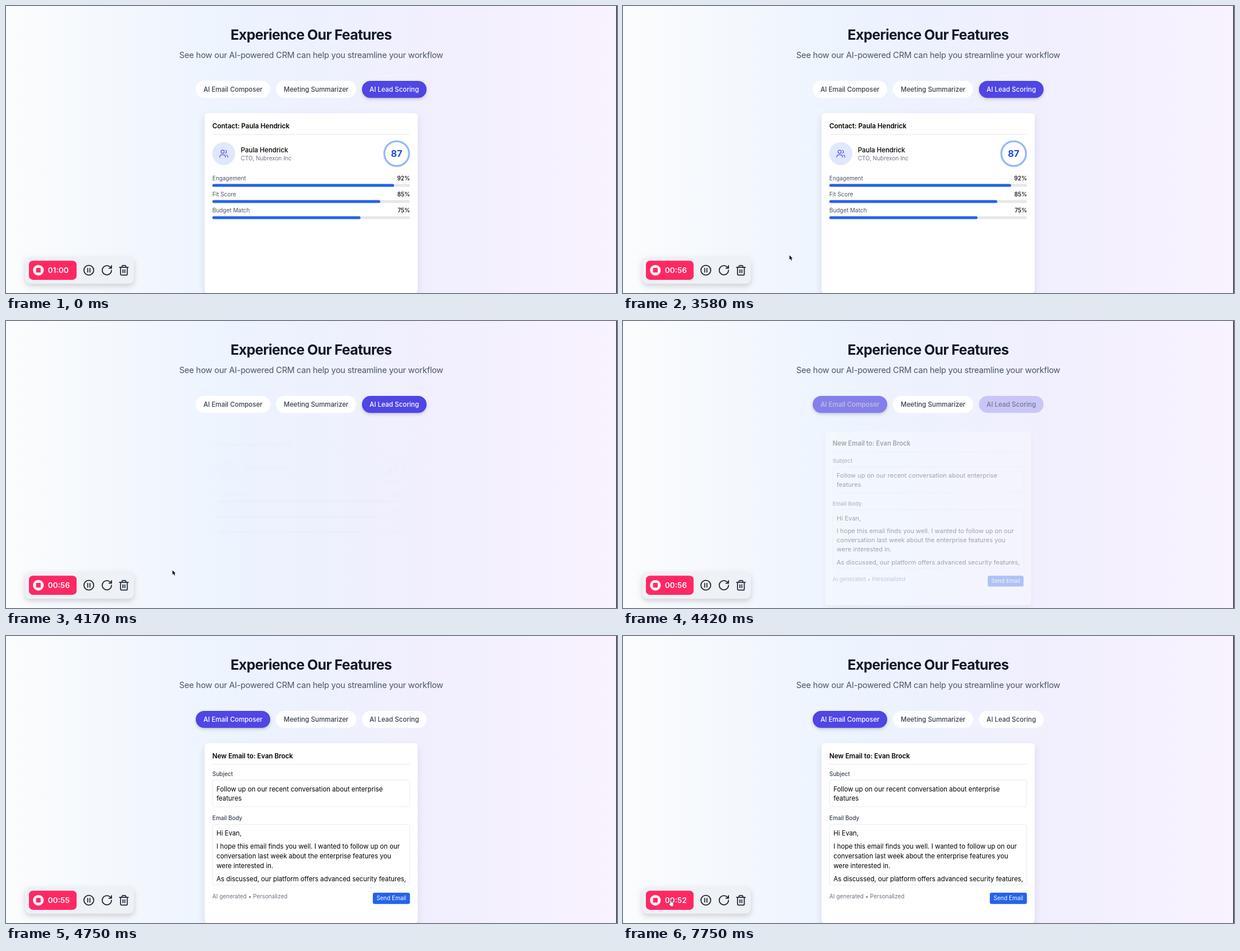
Write an HTML page with a canvas that moves like this. It is 1066 px wide and 502 px high and loops after 8000 ms.

```html
<!DOCTYPE html>
<html lang="en">
<head>
<meta charset="utf-8">
<title>CRM feature demo</title>
<style>
  html, body { margin: 0; width: 100%; height: 100%; overflow: hidden; background: #f3f4fe; }
  canvas { display: block; width: 1066px; height: 502px; }
</style>
</head>
<body>
<canvas id="stage"></canvas>
<script>
const W = 1066, H = 502, LOOP = 8000, FPS = 12;
const INK = '#374151', GREY = '#6b7280', LINE = '#e5e7eb', BLUE = '#2563eb';
const INDIGO = [79, 70, 229], WHITE = [255, 255, 255], SLATE = [55, 65, 81];
const dpr = window.devicePixelRatio || 1;

function makeLayer(canvas) {
  canvas.width = W * dpr;
  canvas.height = H * dpr;
  return canvas.getContext('2d');
}

const stage = makeLayer(document.getElementById('stage'));
const cardLayer = makeLayer(document.createElement('canvas'));
let g = stage;

// ---------- helpers ----------
const clamp = v => Math.max(0, Math.min(1, v));
const easeInOut = v => v < 0.5 ? 2 * v * v : 1 - 2 * (1 - v) * (1 - v);
const mix = (a, b, p) => `rgb(${a.map((v, i) => Math.round(v + (b[i] - v) * p))})`;

// Position on a path of [time, x, y] points, or null before it begins.
function follow(path, t) {
  if (t < path[0][0] - 5) return null;
  let i = 0;
  while (i < path.length - 2 && t > path[i + 1][0]) i++;
  const [t0, x0, y0] = path[i], [t1, x1, y1] = path[i + 1];
  const p = clamp((t - t0) / (t1 - t0));
  return [x0 + (x1 - x0) * p, y0 + (y1 - y0) * p];
}

function text(str, x, y, size, color, weight = 400, align = 'left', tracking = 0) {
  g.font = `${weight} ${size}px Inter, "Open Sans", sans-serif`;
  g.letterSpacing = `${tracking * size}px`;
  g.textAlign = align;
  g.fillStyle = color;
  g.fillText(str, x, y);
}

function box(x, y, w, h, r, fill, stroke) {
  g.beginPath();
  g.roundRect(x, y, w, h, r);
  if (fill) { g.fillStyle = fill; g.fill(); }
  if (stroke) { g.strokeStyle = stroke; g.lineWidth = 0.83; g.stroke(); }
}

function disc(x, y, r, fill) {
  g.beginPath();
  g.arc(x, y, r, 0, Math.PI * 2);
  g.fillStyle = fill;
  g.fill();
}

function shadow(color, dy, blur, draw) {
  g.save();
  g.shadowColor = color;
  g.shadowOffsetY = dy * dpr;
  g.shadowBlur = blur * dpr;
  draw();
  g.restore();
}

// Line icon on a 24-unit grid, centred on x, y.
function icon(d, x, y, scale, color, width = 2) {
  g.save();
  g.translate(x, y);
  g.scale(scale, scale);
  g.translate(-12, -12);
  g.lineCap = g.lineJoin = 'round';
  g.lineWidth = width;
  g.strokeStyle = color;
  g.stroke(new Path2D(d));
  g.restore();
}

const ICONS = {
  users: 'M16 21v-2a4 4 0 0 0-4-4H6a4 4 0 0 0-4 4v2M13 7a4 4 0 1 1-8 0a4 4 0 1 1 8 0M22 21v-2a4 4 0 0 0-3-3.87M16 3.13a4 4 0 0 1 0 7.75',
  pause: 'M22 12a10 10 0 1 1-20 0a10 10 0 1 1 20 0M9.7 8.2v7.6M14.3 8.2v7.6',
  restart: 'M21 12a9 9 0 1 1-9-9c2.52 0 4.93 1 6.74 2.74L21 8M21 3v5h-5',
  trash: 'M3 6h18M19 6v14c0 1-1 2-2 2H7c-1 0-2-1-2-2V6M8 6V4c0-1 1-2 2-2h4c1 0 2 1 2 2v2M10 11v6M14 11v6'
};

// ---------- page ----------
function drawPage() {
  const bg = g.createLinearGradient(0, 0, W, 0);
  bg.addColorStop(0, '#fbfcfd');
  bg.addColorStop(0.36, '#edf4fe');
  bg.addColorStop(0.5, '#edf1fe');
  bg.addColorStop(0.72, '#f2effe');
  bg.addColorStop(1, '#f8f3fe');
  g.fillStyle = bg;
  g.fillRect(0, 0, W, H);
  text('Experience Our Features', 532.3, 58.6, 24.5, '#111827', 700, 'center', -0.025);
  text('See how our AI-powered CRM can help you streamline your workflow',
    532.5, 91.2, 14.4, '#4b5563', 400, 'center', -0.0137);
}

// on: 0 is idle, 1 is selected
function drawTab(label, x, w, on, raised) {
  const pill = () => box(x, 131, w, 29.8, 14.9, mix(WHITE, INDIGO, on));
  if (raised) shadow('rgba(0,0,0,.17)', 2.5, 5, pill);
  else pill();
  text(label, x + w / 2, 150.2, 11.4, mix(SLATE, WHITE, on), 500, 'center');
}

function drawTabs(t) {
  const p = 1 - Math.pow(1 - clamp((t - 4333.4) / 200), 2.2);
  drawTab('AI Email Composer', 331, 130, p, p > 0);
  drawTab('Meeting Summarizer', 471, 140, 0, false);
  drawTab('AI Lead Scoring', 621, 112.8, 1 - p, p === 0);
}

// ---------- cards ----------
function drawCardBase(title) {
  shadow('rgba(30,41,80,.13)', 6, 13, () => box(346.5, 187.6, 372, 314.9, 6, '#fff'));
  text(title, 360, 214, 11.5, '#000', 600);
  g.fillStyle = LINE;
  g.fillRect(360, 224.2, 344.7, 0.9);
}

function drawScoreCard() {
  drawCardBase('Contact: Paula Hendrick');
  disc(380, 258.2, 20, '#e0e7ff');
  icon(ICONS.users, 380, 258.4, 0.69, '#5b53e0', 1.8);
  text('Paula Hendrick', 409.8, 256, 11.4, '#000', 500);
  text('CTO, Nubrexon Inc', 409.8, 269.9, 9.9, GREY);

  g.beginPath();
  g.arc(681.6, 258.2, 21.6, 0, Math.PI * 2);
  g.lineWidth = 3.3;
  g.strokeStyle = '#93b9fa';
  g.stroke();
  text('87', 681.4, 264, 16.2, '#1d4ed8', 700, 'center');

  [['Engagement', 92], ['Fit Score', 85], ['Budget Match', 75]].forEach(([label, value], i) => {
    const y = 304.6 + i * 28.25;
    text(label, 360, y, 9.9, '#4b5563');
    text(value + '%', 704.7, y, 9.9, '#000', 500, 'right');
    box(360, y + 6.7, 344.7, 5, 2.5, LINE);
    box(360, y + 6.7, 344.7 * value / 100, 5, 2.5, BLUE);
  });
}

function drawEmailCard() {
  drawCardBase('New Email to: Evan Brock');
  text('Subject', 360, 244.6, 9.9, INK, 500);
  box(360.4, 251.9, 344, 46.8, 3.3, null, LINE);
  text('Email Body', 360, 322.3, 9.9, INK, 500);
  box(360.4, 329.7, 344, 105.6, 3.3, null, LINE);
  [
    ['Follow up on our recent conversation about enterprise', 271.5],
    ['features', 288.1],
    ['Hi Evan,', 349],
    ['I hope this email finds you well. I wanted to follow up on our', 372.3],
    ['conversation last week about the enterprise features you', 388.9],
    ['were interested in.', 405.5],
    ['As discussed, our platform offers advanced security features,', 428.8]
  ].forEach(([line, y]) => text(line, 367.2, y, 11.35, '#000'));
  text('AI generated • Personalized', 360, 458.9, 9.9, GREY);
  box(640, 449, 64.7, 19.8, 3.3, BLUE);
  text('Send Email', 672.3, 462.4, 9.9, '#fff', 400, 'center');
}

function drawCard(t) {
  const leaving = t < 4300;
  const o = leaving
    ? 1 - easeInOut(clamp((t - 3750) / 450))
    : Math.sin(clamp((t - 4333.4) / 400) * Math.PI / 2);
  if (o <= 0) return;
  const s = 0.95 + 0.05 * o;
  g = cardLayer;
  g.setTransform(dpr, 0, 0, dpr, 0, 0);
  g.clearRect(0, 0, W, H);
  g.translate(532.5, 345);
  g.scale(s, s);
  g.translate(-532.5, -345);
  if (leaving) drawScoreCard(); else drawEmailCard();
  g = stage;
  g.globalAlpha = o;
  g.drawImage(cardLayer.canvas, 0, 0, W, H);
  g.globalAlpha = 1;
}

// ---------- recorder ----------
const TICKS = [1000, 1670, 2580, 3580, 4580, 5670, 6580, 7580];

function drawRecorder(t) {
  const left = 60 - TICKS.filter(k => t >= k - 5).length;
  const clock = left === 60 ? '01:00' : '00:' + left;
  shadow('rgba(0,0,0,.16)', 4, 10, () => box(33.5, 439, 189.5, 46.8, 9, '#eef1f6'));
  box(40, 445.5, 83.2, 33.4, 7, '#ff2863');
  disc(56.5, 462.2, 9.3, '#fff');
  box(52.4, 458.1, 8.2, 8.2, 1.6, '#ff2863');
  text(clock, 73, 466.8, 13.3, '#fff', 600);
  icon(ICONS.pause, 144.5, 462.2, 0.85, '#1f2937', 2.1);
  icon(ICONS.restart, 176, 462.2, 0.9, '#1f2937', 2);
  icon(ICONS.trash, 205.7, 462.2, 0.84, '#1f2937', 2.1);
}

// ---------- pointer ----------
const ARROW = [
  [1000, 128, 496], [1083, 113, 486], [1167, 108.5, 481.5], [1417, 108.5, 481.5],
  [1500, 102.6, 478], [1917, 102.6, 478], [2000, 150, 470], [2083, 255, 445], [2167, 290.4, 436]
];
const HAND = [
  [6583, 396, 145], [6667, 396, 145], [6833, 330, 210], [7000, 190, 340], [7167, 82, 445],
  [7250, 68, 457], [7333, 68, 457], [7417, 64, 463], [7750, 80, 462]
];
const ARROW_SHAPE = new Path2D('M0 0V7.6L1.8 6L3.1 9L4.5 8.4L3.2 5.5H5.6Z');
const HAND_SHAPE = new Path2D('M2.4 6V1.2a.8 .8 0 0 1 1.6 0V4l2.9 .6q1.3 .3 1.2 1.6L7.6 10.4H3.2L.6 7.2q-.5-.9 .3-1.3q.8-.2 1.5 .9Z');

function drawPointer(shape, pos, fill, edge, width) {
  if (!pos) return;
  g.save();
  g.translate(pos[0], pos[1]);
  g.lineJoin = 'round';
  g.lineWidth = width;
  g.strokeStyle = edge;
  g.stroke(shape);
  g.fillStyle = fill;
  g.fill(shape);
  g.restore();
}

// ---------- loop ----------
function render(now) {
  const t = Math.floor((now % LOOP + 5) * FPS / 1000) * 1000 / FPS;
  g.setTransform(dpr, 0, 0, dpr, 0, 0);
  drawPage();
  drawTabs(t);
  drawCard(t);
  drawRecorder(t);
  if (t < 4245) drawPointer(ARROW_SHAPE, follow(ARROW, t), '#111', 'rgba(255,255,255,.85)', 1.2);
  drawPointer(HAND_SHAPE, follow(HAND, t), '#fff', '#333', 1.2);
  g.fillStyle = '#15151c';
  g.fillRect(1064.7, 0, 1.3, H);
}

let start = null;
function tick() {
  const now = performance.now();
  if (start === null) start = now;
  render(now - start);
  requestAnimationFrame(tick);
}
tick();
</script>
</body>
</html>
```
